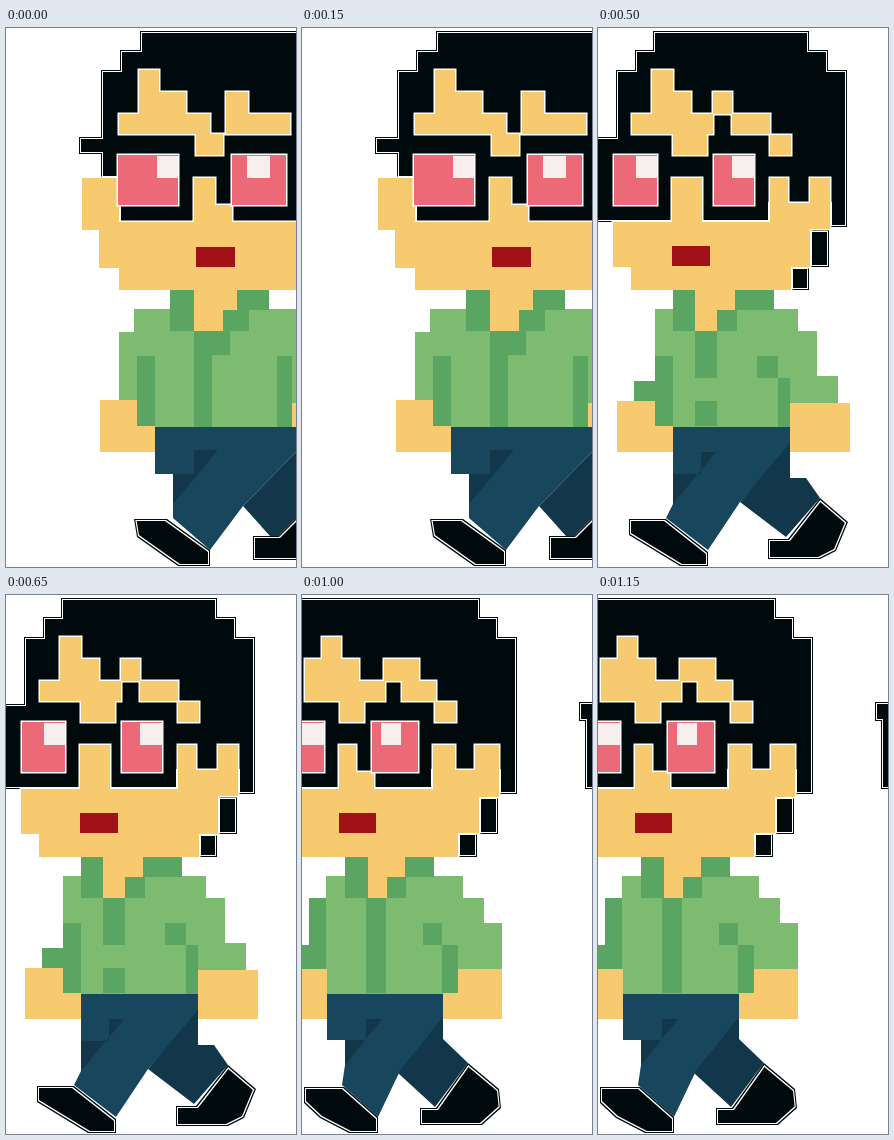
These frames come from a looping animation (290 px wide and 539 px high, 1250 ms). An HTML page:

```html
<!DOCTYPE html>
<html lang="en">
<head>
<meta charset="utf-8">
<title>Walking pixel man</title>
<style>
  html, body { margin: 0; width: 100%; height: 100%; overflow: hidden; background: #fff; }
  svg { display: block; width: 100%; height: 100%; }
  .pose { visibility: hidden; animation: show 1250ms step-end calc((var(--i) - 5) * 250ms) infinite; }
  @keyframes show {
    0% { visibility: visible; }
    20%, 100% { visibility: hidden; }
  }
  .ink { fill: #000a0d; filter: url(#rim); }
  .skin { fill: #f7ca6f; }
  .face, .lens { stroke: #fff; stroke-width: 3; paint-order: stroke; }
  .face { fill: #f7ca6f; }
  .lens { fill: #ec6977; }
  .glint { fill: #f6efed; }
  .mouth { fill: #a01217; }
  .shirt { fill: #7dbb71; }
  .fold { fill: #59a561; }
  .jeans { fill: #18465d; }
  .shade { fill: #12364a; }
</style>
</head>
<body>
<svg viewBox="0 0 290 539" preserveAspectRatio="none">

  <!-- Dark hairline, white band, then the inset fill -->
  <filter id="rim" filterUnits="userSpaceOnUse" x="-12" y="-12" width="314" height="563" color-interpolation-filters="sRGB">
    <feMorphology in="SourceAlpha" operator="erode" radius="1" result="bandArea"/>
    <feFlood flood-color="#fff"/>
    <feComposite in2="bandArea" operator="in" result="band"/>
    <feMorphology in="SourceGraphic" operator="erode" radius="2" result="core"/>
    <feMerge>
      <feMergeNode in="SourceGraphic"/>
      <feMergeNode in="band"/>
      <feMergeNode in="core"/>
    </feMerge>
  </filter>

  <g class="pose" style="--i:0">
    <path class="ink" d="M134 3H299V195H113V150H95V126H73V109H95V42H114V22H134Z"/>
    <path class="face" d="M76 150H113V194H188V150H209V177H226V194H299V262H113V240H93V202H76Z"/>
    <path class="face" d="M133 42H153V64H180V86H204V106H217V127H190V106H113V86H133ZM220 64H242V86H284V106H220Z"/>
    <path class="lens" d="M112 127H172V177H112ZM226 127H280V177H226Z"/>
    <path class="glint" d="M151 128H172V150H151ZM241 128H264V150H241Z"/>
    <path class="mouth" d="M190 219H229V239H190Z"/>
    <path class="shirt" d="M128 281H290V399H131V373H113V304H128Z"/>
    <path class="fold" d="M164 262H188V303H164ZM231 262H263V282H243V303H224V327H206V399H188V303H217V282H231ZM131 328H149V399H131ZM271 328H286V399H271Z"/>
    <path class="skin" d="M188 262H231V282H217V303H188ZM94 372H131V398H149V424H94ZM286 375H290V424H286Z"/>
    <path class="jeans" d="M149 399H290V424L237 478L204 522L167 490V446H149Z"/>
    <path class="shade" d="M188 422H212L167 476V446H188ZM290 424V490L272 508H264L237 478Z"/>
    <path class="ink" d="M128 491H161L204 522V538H172L131 509ZM247 508H272L299 481V532H247Z"/>
  </g>

  <g class="pose" style="--i:1">
    <path class="ink" d="M88 3H247V22H268V42H286V150H268V176H223V194H45V126H33V109H51V42H69V22H88ZM264 202H286V227H264ZM246 227H266V251H246Z"/>
    <path class="face" d="M50 194H125V150H148V177H152V194H225V150H244V175H266V150H288V200H264V227H246V262H68V240H50Z"/>
    <path class="face" d="M86 42H105V64H127V86H147V106H153V127H125V106H68V86H86ZM164 64H185V86H225V106H164ZM225 107H244V127H225Z"/>
    <path class="lens" d="M57 127H109V177H57ZM164 127H210V177H164Z"/>
    <path class="glint" d="M88 128H109V150H88ZM181 128H202V150H181Z"/>
    <path class="mouth" d="M125 219H165V238H125Z"/>
    <path class="shirt" d="M85 281H245V303H264V328H285V373H241V399H91V373H50V351H68V303H85Z"/>
    <path class="fold" d="M106 262H137V282H142V303H120V282H106ZM176 262H210V282H180V303H160V282H176ZM68 303H86V328H106V399H86V373H50V351H68ZM142 303H161V350H142ZM142 373H161V399H142ZM206 328H225V350H248V373H240V399H221V350H206Z"/>
    <path class="skin" d="M137 262H176V282H160V303H142V282H137ZM35 373H86V399H92V424H35ZM241 373H287V424H241Z"/>
    <path class="jeans" d="M103 399H230V430L186 477L152 520L111 490L123 470V445H106V424H103Z"/>
    <path class="shade" d="M142 422H162L123 475V445H142ZM230 425V446L252 468L214 508L186 477Z"/>
    <path class="ink" d="M75 491H113L152 523V538H122L75 503ZM252 468L282 495L262 530H205V510H216Z"/>
  </g>

  <g class="pose" style="--i:2">
    <path class="ink" d="M55 3H211V22H230V42H249V199H232V176H172V194H-9V109H18V42H37V22H55ZM212 202H231V239H212ZM193 239H211V262H193Z"/>
    <path class="face" d="M15 194H74V150H104V194H172V150H190V175H212V150H232V201H212V239H193V262H33V239H15Z"/>
    <path class="face" d="M54 42H75V64H93V86H115V106H109V127H75V106H34V86H54ZM115 64H134V86H172V106H134V86H115ZM172 107H193V127H172Z"/>
    <path class="lens" d="M16 127H59V177H16ZM116 127H156V177H116Z"/>
    <path class="glint" d="M38 128H59V150H38ZM134 128H157V150H134Z"/>
    <path class="mouth" d="M74 218H112V238H74Z"/>
    <path class="shirt" d="M57 281H200V303H219V348H240V375H192V399H75V373H36V353H57Z"/>
    <path class="fold" d="M75 262H97V303H75ZM137 262H176V282H139V303H119V350H97V303H119V282H137ZM97 373H119V398H97ZM57 328H75V399H57V373H36V353H57ZM159 328H180V350H192V399H180V350H159Z"/>
    <path class="skin" d="M97 262H137V282H119V303H97ZM19 373H57V398H75V424H19ZM192 375H252V424H192Z"/>
    <path class="jeans" d="M75 399H192V418L142 474L110 522L68 490L75 476Z"/>
    <path class="shade" d="M103 424H118L75 476V446H103ZM192 415V450H208L222 470L188 509L142 474Z"/>
    <path class="ink" d="M31 491H68L110 524V538H82L31 507ZM222 470L250 494L238 523L222 531H170V511H190Z"/>
  </g>

  <g class="pose" style="--i:3">
    <path class="ink" d="M48 3H192V22H212V42H232V199H221V176H163V194H-9V107H10V42H29V22H48ZM288 108H299V126H288ZM199 202H217V239H199ZM180 239H198V262H180Z"/>
    <path class="face" d="M8 194H65V150H88V177H95V194H163V150H184V175H203V150H221V200H199V239H180V262H27V239H8Z"/>
    <path class="face" d="M46 42H65V64H87V86H106V106H97V127H66V106H26V86H46ZM106 64H126V86H163V106H126V86H106ZM163 107H184V127H163Z"/>
    <path class="lens" d="M8 128H50V177H8ZM105 128H148V177H105Z"/>
    <path class="glint" d="M30 129H50V150H30ZM125 129H146V150H125Z"/>
    <path class="mouth" d="M66 218H107V238H66Z"/>
    <path class="shirt" d="M50 281H184V303H204V328H222V375H165V399H49V375H12V351H30V303H50Z"/>
    <path class="fold" d="M65 262H88V303H65ZM126 262H165V282H129V303H109V282H126ZM86 303H107V350H86ZM86 373H107V398H86ZM30 303H49V375H12V351H30ZM146 328H165V350H178V374H165V350H146Z"/>
    <path class="skin" d="M88 262H126V282H109V303H88ZM12 373H49V424H12ZM165 374H222V416H204V424H165Z"/>
    <path class="jeans" d="M49 399H165V424L106 468L76 522L37 490L49 466Z"/>
    <path class="shade" d="M50 424H70L50 452ZM155 424H183V444L208 470L174 508L125 468H106Z"/>
    <path class="ink" d="M6 492H38L76 522V538H50L6 508ZM208 468L233 493L203 530H150V507H174Z"/>
  </g>

  <g class="pose" style="--i:4">
    <path class="ink" d="M-9 3H178V22H196V42H215V199H197V176H131V194H-9ZM277 107H299V194H283V126H277ZM177 202H196V239H177ZM156 238H175V262H156Z"/>
    <path class="face" d="M-9 194H37V150H54V177H72V194H131V150H153V175H173V150H197V202H177V238H156V262H-9Z"/>
    <path class="face" d="M20 42H39V64H57V86H83V106H62V127H38V106H3V64H20ZM82 64H117V86H134V106H100V86H82ZM133 107H154V127H133Z"/>
    <path class="lens" d="M-9 127H22V177H-9ZM70 127H116V177H70Z"/>
    <path class="glint" d="M0 128H22V150H0ZM79 128H99V150H79Z"/>
    <path class="mouth" d="M37 218H74V238H37Z"/>
    <path class="shirt" d="M24 281H161V303H182V328H200V374H141V399H24V373H0V350H7V303H24Z"/>
    <path class="fold" d="M43 262H66V303H43ZM103 262H132V282H104V303H85V282H103ZM64 303H84V398H64ZM7 303H24V374H0V350H7ZM121 328H140V350H156V398H140V350H121Z"/>
    <path class="skin" d="M66 262H103V282H85V303H66ZM0 374H25V424H0ZM156 374H200V424H141V398H156Z"/>
    <path class="jeans" d="M25 399H141V426L97 478L76 522L40 490L43 470V445H25Z"/>
    <path class="shade" d="M64 424H80L43 470V445H64ZM141 422V444L166 468L133 512L96 478Z"/>
    <path class="ink" d="M2 492H42L76 522V538H47L18 523L2 508ZM166 468L197 494L199 513L180 530H118V513H134Z"/>
  </g>

</svg>
</body>
</html>
```
